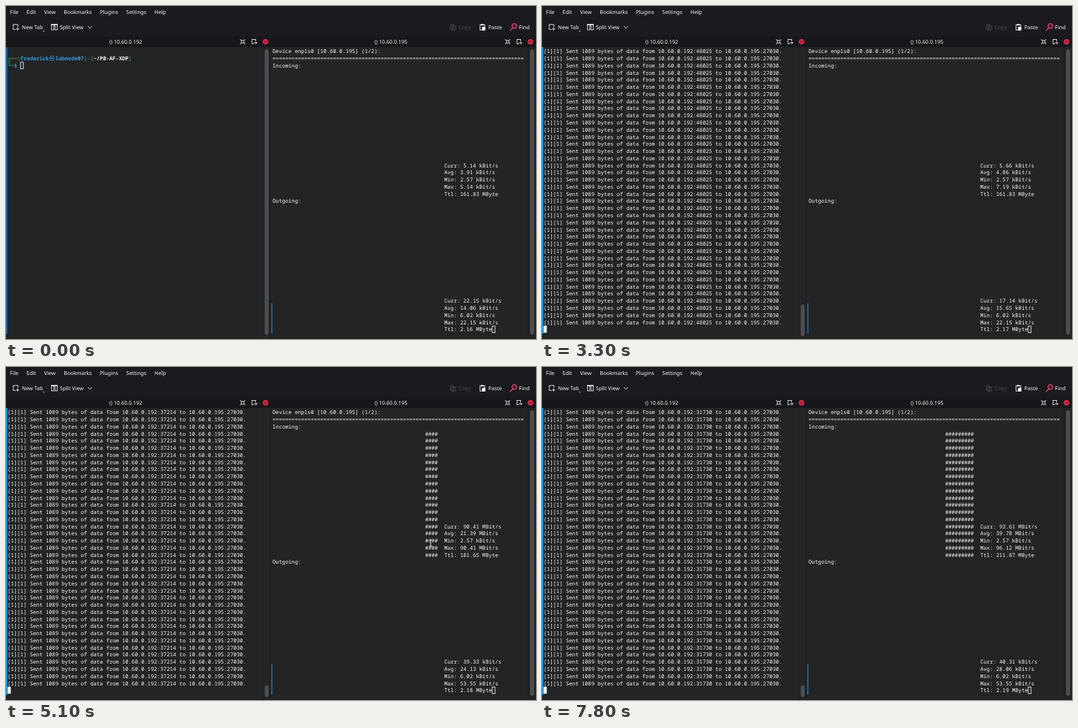
Animation, 800 px wide and 503 px high, one loop 8 s. Source, as an HTML page with a canvas:

```html
<!DOCTYPE html>
<html lang="en">
<head>
<meta charset="utf-8">
<title>Traffic monitor</title>
<style>
  html, body { margin: 0; width: 100%; height: 100%; overflow: hidden; background: #222426; }
  canvas { display: block; width: 800px; height: 503px; }
</style>
</head>
<body>
<canvas id="stage"></canvas>
<script>
const LOOP = 8000, STEP = 50, TICK = 500;
const W = 800, H = 503;
const COL = 4.8, ROW = 10.77, TOP = 63, LAST = 39;
const LEFT = 2.4, RIGHT = 402.3;
const MONO = "'Noto Sans Mono', monospace";
const SANS = "'Noto Sans', sans-serif";
const CJK = "'Noto Sans CJK KR', 'Noto Sans CJK JP', sans-serif";
const FG = '#fcfcfc', GREEN = '#3fa84c', BLUE = '#3a9be2', DIM = '#1f6aa6', BRIGHT = '#1d99f3';
const BURST = 7;                      // tick at which the traffic arrives
const START = 3050, PORT_FROM = 2400; // output begins; the port changes every second

const canvas = document.getElementById('stage');
const ctx = canvas.getContext('2d');
const dpr = window.devicePixelRatio || 1;
canvas.width = W * dpr;
canvas.height = H * dpr;
ctx.textRendering = 'geometricPrecision';

// Key points of the rates: tick, kBit/s (MBit/s for incoming once the burst runs)
const inKeys = [[0, 5.14], [1, 7.19], [2, 2.95], [3, 5.65], [4, 5.8], [6, 5.66],
  [7, 56.6], [8, 66.94], [9, 85.47], [11, 95.34], [12, 96.12], [13, 79.67], [14, 91.63], [15, 93.61]];
const outKeys = [[0, 22.15], [1, 16.57], [3, 17.15], [4, 15.98], [6, 17.14],
  [7, 47.71], [8, 53.55], [9, 40.79], [11, 37.87], [12, 36.77], [14, 41.29], [15, 40.31]];
const ports = [48025, 1354, 37214, 11842, 55066, 31730];

// Pointer routes: time, x, y
const routes = [
  [[50, 775, 10], [550, 60, 62], [1200, 150, 290], [1550, 148, 277], [2000, 116, 262], [2200, 116, 262]],
  [[3850, 788, 12], [4200, 420, 238], [4350, 463, 245], [4750, 641, 266], [5250, 641, 266],
   [5900, 708, 249], [6500, 699, 246], [7250, 699, 246], [7800, 778, 505]]
];

// Linear blend between key points, for every value after the first
function along(keys, at) {
  const i = Math.max(1, keys.findIndex(p => p[0] >= at));
  const a = keys[i - 1], b = keys[i];
  const f = (at - a[0]) / (b[0] - a[0]);
  return a.slice(1).map((v, j) => v + (b[j + 1] - v) * f);
}

// Running mean, maximum and sum of a rate; four samples came before the first tick
function measure(keys, k, firstMean, scale = () => 1) {
  let sum = 0, max = 0, cur = 0;
  for (let i = 0; i <= k; i++) {
    cur = along(keys, i)[0] * scale(i);
    if (i) sum += cur;
    max = Math.max(max, cur);
  }
  return { cur, max, sum, avg: (firstMean * 4 + sum) / (k + 4) };
}

function rect(x, y, w, h, color) {
  ctx.fillStyle = color;
  ctx.fillRect(x, y, w, h);
}

function line(points, color, width = 0.9) {
  ctx.strokeStyle = color;
  ctx.lineWidth = width;
  ctx.beginPath();
  points.forEach(([x, y], i) => i ? ctx.lineTo(x, y) : ctx.moveTo(x, y));
  ctx.stroke();
}

function box(x, y, w, h, color, width = 0.9) {
  ctx.strokeStyle = color;
  ctx.lineWidth = width;
  ctx.strokeRect(x, y, w, h);
}

function disc(x, y, r, color) {
  ctx.beginPath();
  ctx.arc(x, y, r, 0, 7);
  ctx.fillStyle = color;
  ctx.fill();
}

// Drawn at ten times the size and scaled down to keep fractional advances
function text(str, x, y, { font = SANS, color = FG, weight = 400, size = 7.95, align = 'left' } = {}) {
  ctx.save();
  ctx.translate(x, y);
  ctx.scale(0.1, 0.1);
  ctx.font = `${weight} ${size * 10}px ${font}`;
  ctx.fillStyle = color;
  ctx.textAlign = align;
  ctx.fillText(str, 0, 0);
  const width = ctx.measureText(str).width / 10;
  ctx.restore();
  return width;
}

function cell(str, x0, col, row, color = FG, weight = 500) {
  text(str, x0 + col * COL, TOP + 8.3 + row * ROW, { font: MONO, size: COL / 0.6, color, weight });
}

function cursor(x0, col, row, filled) {
  const x = x0 + col * COL, y = TOP + row * ROW;
  if (filled) rect(x, y, COL, ROW - 0.3, FG);
  else box(x + 0.4, y + 0.4, COL - 0.6, ROW - 0.9, FG);
}

function toolbar() {
  rect(0, 0, W, 46, '#1b1a1f');
  let x = 6;
  for (const name of ['File', 'Edit', 'View', 'Bookmarks', 'Plugins', 'Settings', 'Help']) {
    x += text(name, x, 12.2) + 12.3;
  }

  box(11, 28, 7, 7.5, FG);
  rect(14.5, 31.5, 6, 6, '#1b1a1f');
  line([[17.5, 32.2], [17.5, 37.2]], FG);
  line([[15, 34.7], [20, 34.7]], FG);
  text('New Tab', 24, 34.7);
  line([[55.5, 37.2], [57, 38.6], [58.5, 37.2]], FG, 0.7);

  box(68.7, 28, 3.4, 8, FG);
  box(74, 28, 3.4, 8, FG);
  rect(68.3, 27.4, 9.5, 1.5, FG);
  text('Split View', 81.3, 34.7);
  line([[123.6, 30.6], [126.7, 33.6], [129.8, 30.6]], FG);

  const off = '#4b4b50';
  box(670.5, 28, 5, 7, off);
  box(673.2, 30.2, 5.5, 6.5, off);
  text('Copy', 683, 34.7, { color: off });

  box(715.5, 28.3, 7.2, 8, FG);
  rect(717, 27.2, 4, 2, FG);
  rect(718.5, 31.5, 5, 5.5, FG);
  text('Paste', 728, 34.7);

  line([[760.8, 37.3], [764.8, 33.2]], '#d2355f', 1.7);
  disc(767.4, 30.2, 4.2, '#e0506f');
  disc(767.4, 30.2, 2.9, '#4a1c33');
  text('Find', 774.3, 34.7);
}

function header(title, mid, end) {
  text('() ' + title, mid, 57, { align: 'center' });
  const x = end - 34.5;
  box(x - 2, 52, 4, 4, FG);
  for (const a of [-1, 1]) for (const b of [-1, 1]) {
    line([[x + a * 2, 54 + b * 2], [x + a * 4, 54 + b * 4]], FG);
  }
  box(end - 20.5, 50.5, 5.5, 6.5, FG);
  rect(end - 17.5, 53.3, 5, 5, '#17171b');
  line([[end - 17.5, 55.7], [end - 13, 55.7]], FG);
  line([[end - 15, 53.7], [end - 13, 55.7], [end - 15, 57.7]], FG);
  disc(end, 54, 4.3, '#d92b47');
  for (const y of [53.1, 55]) line([[end - 2.2, y], [end + 2.2, y]], '#6d1526', 0.8);
}

function scrollbar(x, top, bottom) {
  ctx.beginPath();
  ctx.roundRect(x, top, 4.6, bottom - top, 2.3);
  ctx.fillStyle = '#4a4c4f';
  ctx.fill();
  ctx.strokeStyle = '#6a6c6f';
  ctx.lineWidth = 0.7;
  ctx.stroke();
}

function prompt() {
  const y1 = TOP + 1.5 * ROW, y2 = y1 + ROW;
  line([[LEFT + 3 * COL, y1], [LEFT + COL / 2, y1], [LEFT + COL / 2, y2], [LEFT + 2 * COL, y2]], GREEN);
  cell('(', LEFT, 3, 1, GREEN);
  cell('frederick', LEFT, 4, 1, BLUE, 700);
  text('㉿', LEFT + 13 * COL + 0.8, TOP + 8.3 + ROW, { font: CJK, color: BLUE, weight: 700 });
  cell('labnode07', LEFT, 15, 1, BLUE, 700);
  cell(')-[', LEFT, 24, 1, GREEN);
  cell('~/PB-AF-XDP', LEFT, 27, 1, FG, 700);
  cell(']', LEFT, 38, 1, GREEN);
  cell('$', LEFT, 2, 2, BLUE, 700);
}

function typed(t) {
  if (t < 2250) return 'clear'.slice(0, Math.max(0, Math.floor((t - 700) / 90)));
  return t < 2600 ? '' : 'sudo pcktbatch';
}

function leftPane(t) {
  const running = t >= START;
  rect(0, 62, 2, 433, running ? BRIGHT : DIM);
  if (running) {
    const port = ports[Math.floor((t - PORT_FROM) / 1000)];
    const row = `[1][1] Sent 1089 bytes of data from 10.60.0.192:${port} to 10.60.0.195:27030.`;
    for (let i = 0; i < LAST; i++) cell(row, LEFT, 0, i);
    cursor(LEFT, 0, LAST, true);
    const lines = 40 + Math.min(1000, 1.33 * (t - START));
    scrollbar(391.2, 498 - Math.max(15, 432 * 40 / lines), 498);
    return;
  }
  scrollbar(391.2, 66, 496);
  if (t === 2250) return cursor(LEFT, 0, 0, true);
  prompt();
  const cmd = typed(t);
  cell(cmd, LEFT, 4, 2, GREEN);
  cursor(LEFT, 4 + cmd.length, 2, t >= 500);
}

function stats(first, { cur, avg, max }, min, total) {
  const rate = v => v < 1000 ? `${v.toFixed(2)} kBit/s` : `${(v / 1000).toFixed(2)} MBit/s`;
  [`Curr: ${rate(cur)}`, `Avg: ${rate(avg)}`, `Min: ${rate(min)}`, `Max: ${rate(max)}`, `Ttl: ${total.toFixed(2)} MByte`]
    .forEach((row, i) => cell(row, RIGHT, 54, first + i));
}

function rightPane(t) {
  const k = Math.floor(t / TICK);
  const incoming = measure(inKeys, k, 3.91, i => i < BURST ? 1 : 1000);
  const outgoing = measure(outKeys, k, 14.06);
  const perTick = 0.0662 / 1000; // MByte per kBit/s

  cell('Device enp1s0 [10.60.0.195] (1/2):', RIGHT, 0, 0);
  cell('='.repeat(79), RIGHT, 0, 1);
  cell('Incoming:', RIGHT, 0, 2);
  cell('Outgoing:', RIGHT, 0, 21);
  const bars = Math.max(0, k - BURST + 1);
  for (let row = 3; row <= 20; row++) cell('#'.repeat(bars), RIGHT, 52 - bars, row);
  stats(16, incoming, 2.57, 161.83 + incoming.sum * perTick);
  stats(35, outgoing, 6.02, 2.16 + outgoing.sum * perTick);
  cursor(RIGHT, 69, LAST, false);
  rect(400.3, 449, 2, 45.5, DIM);
  scrollbar(791.8, 66, 496);
}

function pointer(t) {
  const route = routes.find(r => t >= r[0][0] && t < r[r.length - 1][0]);
  if (!route) return;
  const [x, y] = along(route, t);
  if (y < 62) {
    ctx.beginPath();
    [[0, 0], [0, 9], [2.3, 6.9], [6.3, 6.6]].forEach(([dx, dy]) => ctx.lineTo(x + dx, y + dy));
    ctx.closePath();
    ctx.fillStyle = '#151515';
    ctx.fill();
    ctx.strokeStyle = FG;
    ctx.lineWidth = 0.8;
    ctx.stroke();
    return;
  }
  for (const [color, width] of [['#17181a', 2.6], ['#f0f0f0', 1.2]]) {
    line([[x, y - 4.8], [x, y + 4.8]], color, width);
    for (const end of [y - 4.8, y + 4.8]) line([[x - 2.6, end], [x + 2.6, end]], color, width);
  }
}

function draw(t) {
  ctx.setTransform(dpr, 0, 0, dpr, 0, 0);
  rect(0, 0, W, H, '#222426');
  toolbar();
  rect(0, 46, W, 16, '#17171b');
  header('10.60.0.192', 180.7, 391.7);
  header('10.60.0.195', 581, 791.7);
  rect(387.5, 62, 0.8, 441, '#1c1d20');
  rect(398.5, 46, 1, 457, '#1a1b1e');
  rect(787.5, 62, 0.8, 441, '#1c1d20');
  leftPane(t);
  rightPane(t);
  pointer(t);
}

const begin = performance.now();
let shown = -1;
function tick() {
  const t = Math.floor(((performance.now() - begin) % LOOP) / STEP) * STEP;
  if (t !== shown) draw(shown = t);
  requestAnimationFrame(tick);
}
tick();
</script>
</body>
</html>
```
